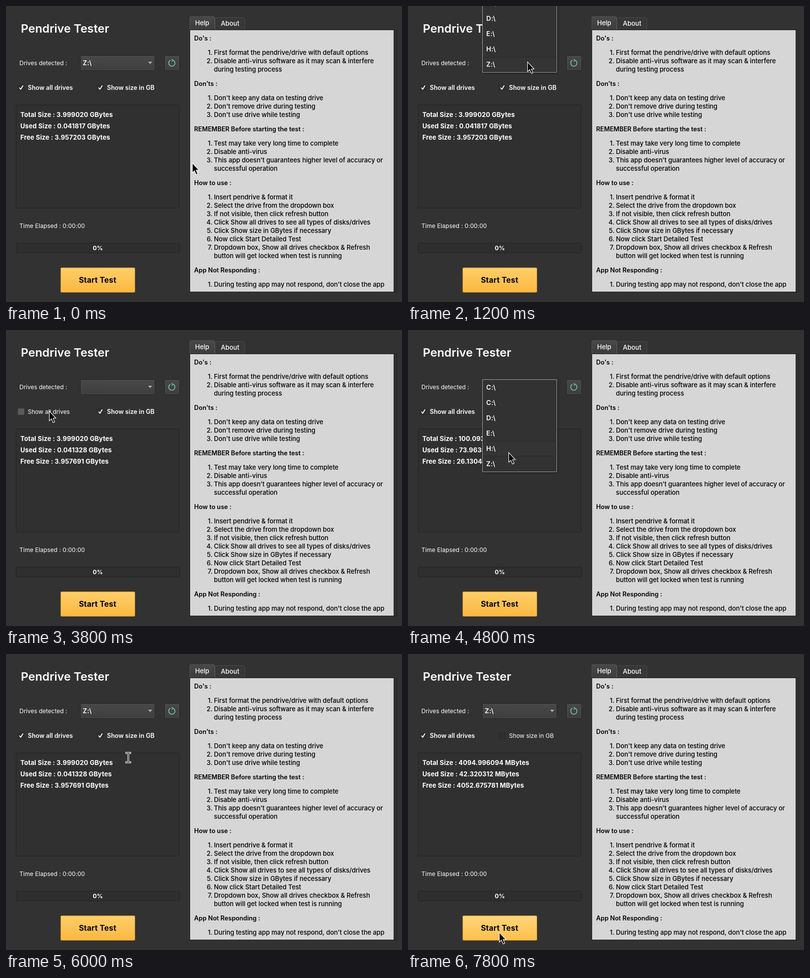
Write an HTML page with a canvas that moves like this. It is 800x600 px and loops after 8000 ms.

```html
<!DOCTYPE html>
<html lang="en">
<head>
<meta charset="utf-8">
<title>Pendrive Tester</title>
<style>
  html, body { margin: 0; width: 100%; height: 100%; overflow: hidden; background: #323232; }
  canvas { display: block; }
</style>
</head>
<body>
<canvas id="stage" width="800" height="600"></canvas>
<script>
const ctx = document.getElementById('stage').getContext('2d');
const LOOP = 8000, TICK = 1000 / 15;
const WHITE = '#ffffff', EDGE = '#222222';

const HELP = [
  ["Do's :", 'First format the pendrive/drive with default options',
    'Disable anti-virus software as it may scan & interfere|during testing process'],
  ["Don'ts :", "Don't keep any data on testing drive", "Don't remove drive during testing",
    "Don't use drive while testing"],
  ['REMEMBER Before starting the test :', 'Test may take very long time to complete', 'Disable anti-virus',
    "This app doesn't guarantees higher level of accuracy or|successful operation"],
  ['How to use :', 'Insert pendrive & format it', 'Select the drive from the dropdown box',
    'If not visible, then click refresh button', 'Click Show all drives to see all types of disks/drives',
    'Click Show size in GBytes if necessary', 'Now click Start Detailed Test',
    'Dropdown box, Show all drives checkbox & Refresh|button will get locked when test is running'],
  ['App Not Responding :', "During testing app may not respond, don't close the app"]
];
const DRIVES = ['C:\\', 'C:\\', 'D:\\', 'E:\\', 'H:\\', 'Z:\\'];

// Pointer path: time, x, y
const PATH = [
  [133, 376, 318], [267, 362, 390], [400, 300, 528], [533, 268, 300], [667, 245, 98], [733, 243, 108],
  [867, 243, 108], [1200, 241, 113], [2267, 241, 113], [2533, 87, 164], [3933, 87, 164], [4133, 205, 112],
  [4533, 205, 112], [4800, 203, 248], [5067, 215, 266], [5400, 240, 301], [5600, 284, 230], [5733, 240, 152],
  [5800, 240, 152], [6000, 247, 210], [6267, 262, 239], [6467, 240, 190], [6667, 254, 171],
  [7533, 254, 171], [7800, 184, 564]
];

function pointerAt(t) {
  const i = PATH.findIndex(p => p[0] >= t);
  if (i === 0) return PATH[0].slice(1);
  if (i < 0) return PATH[PATH.length - 1].slice(1);
  const [t0, x0, y0] = PATH[i - 1], [t1, x1, y1] = PATH[i];
  const k = (t - t0) / (t1 - t0);
  return [Math.round(x0 + (x1 - x0) * k), Math.round(y0 + (y1 - y0) * k)];
}

function text(str, x, y, size, weight = 400, color = WHITE, spacing = 0, align = 'left') {
  ctx.font = `${weight} ${size}px Inter, sans-serif`;
  ctx.letterSpacing = spacing + 'px';
  ctx.textAlign = align;
  ctx.fillStyle = color;
  ctx.fillText(str, x, y);
}

function box(x, y, w, h, fill, edge, radius = 0) {
  ctx.beginPath();
  ctx.roundRect(x + .5, y + .5, w - 1, h - 1, radius);
  ctx.fillStyle = fill;
  ctx.fill();
  if (!edge) return;
  ctx.strokeStyle = edge;
  ctx.lineWidth = 1;
  ctx.stroke();
}

function shade(y, h, top, bottom) {
  const g = ctx.createLinearGradient(0, y, 0, y + h);
  g.addColorStop(0, top);
  g.addColorStop(1, bottom);
  return g;
}

function stroke(path, color, width) {
  ctx.strokeStyle = color;
  ctx.lineWidth = width;
  ctx.stroke(new Path2D(path));
}

function drawHelp() {
  box(371, 21, 51, 29, shade(21, 28, '#484848', '#3c3c3c'), '#555555', 2);
  box(422, 23, 61, 26, '#373737', '#4a4a4a', 2);
  text('Help', 382, 39, 13, 500);
  text('About', 434, 40, 13, 500);
  box(371, 48, 419, 532, '#303030', EDGE);
  ctx.fillStyle = '#d6d6d6';
  ctx.fillRect(372, 49, 411, 530);
  let y = 70;
  for (const [title, ...items] of HELP) {
    text(title, 380, y, 12.7, 600, '#000000');
    y += 29;
    items.forEach((item, i) => {
      text(i + 1 + '.', 417, y, 13, 500, '#000000', -.08, 'right');
      for (const line of item.split('|')) {
        text(line, 420, y, 13, 500, '#000000', -.08);
        y += 17;
      }
    });
    y += 12;
  }
}

function checkbox(x, label, on, lit) {
  box(x, 159, 13, 13, lit ? '#5a5a5a' : '#2f2f2f', lit ? '#5a5a5a' : '#292929', 1);
  if (on) stroke(`M${x + 3} 165.5l2.8 3.2L${x + 10.5} 161`, WHITE, 1.8);
  text(label, x + 20, 170, on ? 12.5 : 12, on ? 600 : 400, WHITE, on ? 0 : -.05);
}

function drawControls(t, drive, hover) {
  text('Pendrive Tester', 30, 54, 23.5, 600);
  text('Drives detected :', 27, 120, 12);
  const face = shade(101, 29, '#484848', '#3e3e3e');
  box(150, 100, 151, 31, face, EDGE, 2);
  box(151, 101, 149, 29, face, '#505050', 1);
  text(drive, 155, 120, 13.3, 600, WHITE, .4);
  ctx.fillStyle = hover ? '#dddddd' : '#b4b4b4';
  ctx.fill(new Path2D('M287 113h8.5l-4.25 4.5z'));

  box(320, 100, 31, 31, face, EDGE, 2);
  box(321, 101, 29, 29, face, '#505050', 1);
  stroke('M337.5 109.9A6.3 6.3 0 1 1 332 110.2', '#6ed3b4', 1.5);
  stroke('M334.5 107.8l3 2.2-2.8 2.5', '#6ed3b4', 1.3);

  const allOn = t < 3320 || t >= 3920;
  const allLit = t >= 3260 && t < 3320 || t >= 3790 && t < 3920;
  checkbox(24, 'Show all drives', allOn, allLit);
  checkbox(184, 'Show size in GB', t < 6920, t >= 6860 && t < 7590);
}

function drawInfo(t, drive) {
  box(20, 200, 330, 210, '#303030', EDGE, 1);
  let unit = 'GBytes', sizes = ['3.999020', '0.041328', '3.957691'];
  if (t < 1920) sizes = ['3.999020', '0.041817', '3.957203'];
  else if (drive === DRIVES[0]) sizes = ['100.093998', '73.963516', '26.130482'];
  else if (t >= 6920) {
    unit = 'MBytes';
    sizes = ['4094.996094', '42.320312', '4052.675781'];
  }
  ['Total', 'Used', 'Free'].forEach((name, i) =>
    text(`${name} Size : ${sizes[i]} ${unit}`, 29, 225 + 23 * i, 13, 700, WHITE, .08));
  text('Time Elapsed : 0:00:00', 27, 450, 12, 400, WHITE, .05);
  box(20, 480, 331, 21, '#2e2e2e', EDGE, 2);
  text('0%', 185.5, 495, 12, 700, WHITE, 0, 'center');
}

function drawStart(hover) {
  const face = hover ? shade(531, 49, '#ffd57a', '#ffc04b') : shade(531, 49, '#ffce69', '#fbb840');
  box(110, 530, 151, 51, face, '#b58022', 2);
  text('Start Test', 185, 561, 15.6, 700, '#000000', .15, 'center');
}

function drawPopup(top, cy) {
  ctx.save();
  ctx.shadowColor = 'rgba(0,0,0,.5)';
  ctx.shadowBlur = 4;
  ctx.shadowOffsetX = ctx.shadowOffsetY = 1;
  box(150, top, 151, 188, '#323232');
  ctx.restore();
  box(150, top, 151, 188, '#323232', '#a0a0a0');
  const row = Math.max(0, Math.min(5, Math.floor((cy - top - 1) / 31)));
  box(151, top + 1 + row * 31, 149, 31, '#343434', '#292929');
  DRIVES.forEach((name, i) => text(name, 158, top + 21 + 31 * i, 13.3, 600, WHITE, .4));
}

function drawPointer(x, y, beam) {
  ctx.save();
  ctx.translate(x, y);
  if (beam) {
    const shape = 'M-4-9.5H4M0-9.5V9.5M-4 9.5H4';
    ctx.lineCap = 'square';
    stroke(shape, WHITE, 3.4);
    stroke(shape, '#000000', 1.2);
  } else {
    const arrow = 'M.5.5V20L4.8 16 8.2 23.8 11.4 22.3 8.1 14.8H13.8Z';
    ctx.fillStyle = '#000000';
    ctx.fill(new Path2D(arrow));
    stroke(arrow, WHITE, 1.1);
  }
  ctx.restore();
}

function draw(time) {
  const t = Math.floor((time % LOOP + 4) / TICK) * TICK;
  const [x, y] = pointerAt(t);
  const inside = (l, top, r, b) => x >= l && x < r && y >= top && y < b;
  const drive = t < 3320 ? DRIVES[5] : t < 3920 ? '' : t < 5190 ? DRIVES[0] : DRIVES[5];
  const popupTop = t >= 920 && t < 1920 ? -53 : t >= 4390 && t < 5190 ? 100 : null;

  ctx.fillStyle = '#323232';
  ctx.fillRect(0, 0, 800, 600);
  drawHelp();
  drawControls(t, drive, inside(150, 100, 300, 130));
  drawInfo(t, drive);
  drawStart(inside(110, 530, 261, 581));
  if (popupTop !== null) drawPopup(popupTop, y);
  drawPointer(x, y, popupTop === null && inside(20, 200, 350, 410));
}

let start;
function tick(now) {
  start ??= now;
  draw(now - start);
  requestAnimationFrame(tick);
}
draw(0);
requestAnimationFrame(tick);
</script>
</body>
</html>
```
